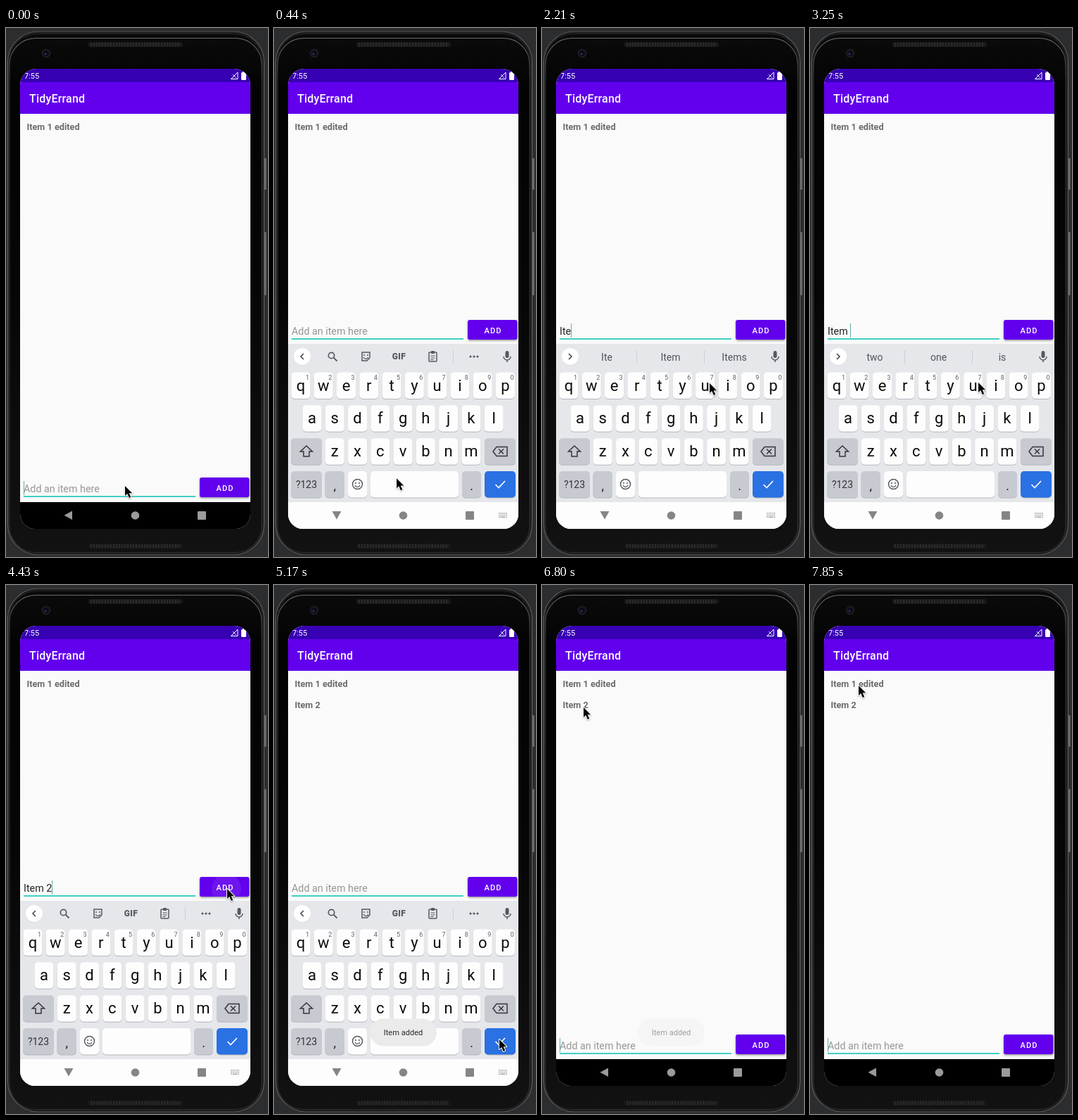
An HTML page with a canvas for the animation above (8 s loop, 372 by 752 pixels).

```html
<!DOCTYPE html>
<html lang="en">
<head>
<meta charset="utf-8">
<title>To-do list demo</title>
<style>
html, body { margin: 0; width: 100%; height: 100%; overflow: hidden; background: #2c2d2f; }
canvas { display: block; width: 372px; height: 752px; }
</style>
</head>
<body>
<canvas id="stage" width="372" height="752"></canvas>
<script>
const ctx = document.getElementById('stage').getContext('2d');
const LOOP = 8000, STEP = 148, STEP_LEAD = 14;
const PURPLE = '#6200ee', PAPER = '#fafafa', ICON = '#565a60';
const KEYBOARD_HEIGHT = 224, PITCH = 32.27;

// Pointer tip: step, x, y
const POINTER = [
  [0, 169, 651], [2, 169, 651], [8, 238, 505], [21, 238, 505], [22, 239, 504],
  [23, 243, 500], [26, 349, 407], [28, 314, 432], [33, 314, 432], [36, 322, 721],
  [38, 327, 651], [42, 327, 651], [45, 89, 200], [46, 59, 174], [49, 63, 160],
  [52, 70, 139], [53, 69, 143]
];
const TYPED = [[12, 'I'], [14, 'It'], [15, 'Ite'], [17, 'Item'], [18, 'Item '], [23, 'Item 2'], [32, '']];
const SUGGESTIONS = [
  [14, ['It', 'It\u2019s', 'Its']], [15, ['Ite', 'Item', 'Items']],
  [17, ['Item', 'items', 'Items']], [19, ['two', 'one', 'is']], [23, null]
];

function box(x, y, w, h, r, fill) {
  ctx.beginPath();
  ctx.roundRect(x, y, w, h, r);
  ctx.fillStyle = fill;
  ctx.fill();
}

function disc(x, y, r, fill) {
  ctx.beginPath();
  ctx.arc(x, y, r, 0, Math.PI * 2);
  ctx.fillStyle = fill;
  ctx.fill();
}

function line(points, color, width = 1.5, close = false) {
  ctx.beginPath();
  points.forEach(([x, y]) => ctx.lineTo(x, y));
  if (close) ctx.closePath();
  ctx.strokeStyle = color;
  ctx.lineWidth = width;
  ctx.stroke();
}

function shape(points, fill) {
  ctx.beginPath();
  points.forEach(([x, y]) => ctx.lineTo(x, y));
  ctx.closePath();
  ctx.fillStyle = fill;
  ctx.fill();
}

function ring(x, y, r, color, width = 1.5, from = 0, to = Math.PI * 2) {
  ctx.beginPath();
  ctx.arc(x, y, r, from, to);
  ctx.strokeStyle = color;
  ctx.lineWidth = width;
  ctx.stroke();
}

function frameBox(x, y, w, h, r, color, width = 1.5) {
  ctx.beginPath();
  ctx.roundRect(x, y, w, h, r);
  ctx.strokeStyle = color;
  ctx.lineWidth = width;
  ctx.stroke();
}

function fade(...stops) {
  const gradient = ctx.createLinearGradient(0, 0, 0, 752);
  stops.forEach(([at, color]) => gradient.addColorStop(at, color));
  return gradient;
}

function text(str, x, y, size, color, { weight = 400, align = 'left', spacing = 0 } = {}) {
  ctx.font = `${weight} ${size}px Roboto, sans-serif`;
  ctx.letterSpacing = spacing + 'px';
  ctx.textAlign = align;
  ctx.fillStyle = color;
  ctx.fillText(str, x, y);
  const width = ctx.measureText(str).width;
  ctx.letterSpacing = '0px';
  return width;
}

const latest = (track, step, initial) =>
  track.reduce((value, [start, next]) => (step >= start ? next : value), initial);

function pointerAt(step) {
  const next = POINTER.findIndex(p => p[0] > step);
  if (next < 0) return POINTER.at(-1).slice(1);
  const [s0, x0, y0] = POINTER[next - 1], [s1, x1, y1] = POINTER[next];
  const u = (step - s0) / (s1 - s0), e = u * u * (3 - 2 * u);
  return [x0 + (x1 - x0) * e, y0 + (y1 - y0) * e];
}

function caretVisible(step) {
  if (step < 2 || (step > 10 && step < 26) || (step > 27 && step < 32)) return true;
  return (step - 44.1 + 68) % 6.8 < 3.4;
}

function drawGrille(y) {
  box(117, y, 134, 7, 3, '#191919');
  for (let x = 120; x < 248; x += 4) {
    line([[x, y + 1], [x + 2, y + 3.5], [x, y + 6]], '#414141', 1);
  }
}

function drawPhone() {
  ctx.fillStyle = '#2c2d2f';
  ctx.fillRect(0, 0, 372, 752);
  box(367, 185, 2.5, 45, 1, '#707173');
  box(367, 290, 2.5, 90, 1, '#707173');
  box(2, 4, 365, 746, 43, '#1d1d1e');
  frameBox(2.5, 5, 364, 744, 43, '#5c5d5e', 1.2);
  box(5, 9, 358, 737, 39, fade([0, '#0c0c0c'], [0.12, '#030303'], [0.5, '#060606'], [1, '#121212']));
  frameBox(5, 14.5, 358, 731, 37, fade([0, '#777'], [0.05, '#555'], [0.1, '#2c2c2c'], [1, '#2c2c2c']), 1.2);
  drawGrille(20);
  drawGrille(733);
  disc(57, 36, 6.5, '#1b1b21');
  disc(57, 36, 4, '#0b0c18');
  disc(56, 37, 1.5, '#2b355a');
}

function drawHeader() {
  ctx.fillStyle = '#3700b3';
  ctx.fillRect(20, 58, 327, 19);
  ctx.fillStyle = PURPLE;
  ctx.fillRect(20, 77, 327, 45);
  text('7:55', 26, 72, 11, '#fff');
  line([[319.5, 72.5], [329, 63], [329, 72.5]], '#fff', 1, true);
  line([[322, 66], [327, 71]], '#fff', 0.8);
  box(334, 63, 7, 11, 1.5, '#fff');
  box(336, 61.7, 3, 2, 0, '#fff');
  text('TidyErrand', 33, 105.5, 16, '#fff', { weight: 500, spacing: 0.2 });
}

function drawForm(step, top) {
  const typed = latest(TYPED, step, '');
  const width = text(typed || 'Add an item here', 25, top + 20.5, 14.3, typed ? '#222' : '#969696');
  if (caretVisible(step)) {
    ctx.fillStyle = '#62aea8';
    ctx.fillRect(Math.round(25 + (typed ? width : 0)), top + 5, 1, 20);
  }
  ctx.fillStyle = '#40d0c4';
  ctx.fillRect(25, top + 26, 244, 2);

  ctx.save();
  ctx.shadowColor = 'rgba(0,0,0,.4)';
  ctx.shadowBlur = 3;
  ctx.shadowOffsetY = 1.5;
  box(275, top, 70.5, 28, 3, PURPLE);
  ctx.restore();
  if (step >= 30 && step < 33) {
    ctx.save();
    ctx.beginPath();
    ctx.roundRect(275, top, 70.5, 28, 3);
    ctx.clip();
    disc(313, top + 17, 21 + (step - 30) * 14, 'rgba(255,255,255,.08)');
    ctx.restore();
  }
  text('ADD', 311, top + 18.6, 11.1, '#fff', { weight: 500, align: 'center', spacing: 1 });
}

function drawKey(x, y, w, fill) {
  box(x, y + 1, w, 37.5, 5, '#b4b7bc');
  box(x, y, w, 37.5, 5, fill);
}

function drawMic(x, y) {
  box(x - 2.5, y - 8, 5, 10, 2.5, ICON);
  ring(x, y, 5, ICON, 1.5, 0, Math.PI);
  line([[x, y + 5], [x, y + 8]], ICON);
}

function drawSmile(x, y) {
  disc(x - 2.5, y - 1.5, 1, ICON);
  disc(x + 2.5, y - 1.5, 1, ICON);
  ring(x, y + 0.5, 3.4, ICON, 1.3, 0.3, Math.PI - 0.3);
}

function drawToolbar(words) {
  const y = 467;
  disc(40, y + 0.6, 12, '#cfd1d5');
  disc(40, y, 12, '#fff');
  const d = words ? -1 : 1;
  line([[40 + 2 * d, y - 4], [40 - 2 * d, y], [40 + 2 * d, y + 4]], '#3f4247');
  drawMic(331, y);
  ctx.fillStyle = '#cdd0d5';
  if (words) {
    ctx.fillRect(134, 458, 1, 19);
    ctx.fillRect(230, 458, 1, 19);
    words.forEach((word, i) => text(word, 92 + i * 90.5, 472.5, 14, '#50545a', { align: 'center' }));
    return;
  }
  ctx.fillRect(254, 458, 1, 19);
  ring(81.5, y - 1.5, 4.2, ICON, 1.7);
  line([[84.7, y + 1.7], [89.5, y + 6.5]], ICON, 1.9);
  line([[136, y + 2], [136, y - 6], [125, y - 6], [125, y + 6], [132, y + 6], [136, y + 2]], ICON);
  drawSmile(130.5, y - 0.5);
  text('GIF', 177.5, y + 4.2, 12, ICON, { weight: 900, align: 'center', spacing: 0.3 });
  frameBox(220, y - 6, 11, 13, 1, ICON);
  box(223, y - 8, 5, 4, 1, ICON);
  [-1, 2, 4.5].forEach((dy, i) => line([[222.5, y + dy], [i === 2 ? 226.5 : 228.5, y + dy]], ICON, 1.1));
  [-5, 0, 5].forEach(dx => disc(284 + dx, y, 1.6, ICON));
}

function drawLetters(letters, x, y) {
  [...letters].forEach((letter, i) => {
    const cx = x + i * PITCH;
    drawKey(cx - 13.5, y, 27, '#fdfdfd');
    text(letter, cx, y + 26, 22, '#0c0c0c', { align: 'center' });
  });
}

function drawKeyboard(step) {
  const special = '#c7cad0';
  ctx.fillStyle = '#e5e7eb';
  ctx.fillRect(20, 449, 327, 226);
  drawToolbar(latest(SUGGESTIONS, step, null));

  drawLetters('qwertyuiop', 38, 489.5);
  for (let i = 0; i < 10; i++) {
    text((i + 1) % 10, 47.5 + i * PITCH, 499.5, 9, '#5c5f64', { align: 'center' });
  }
  drawLetters('asdfghjkl', 54, 536.3);
  drawLetters('zxcvbnm', 86.3, 583.2);

  drawKey(24, 583.2, 44, special);
  line([[46, 594], [37.5, 602], [42, 602], [42, 609], [50, 609], [50, 602], [54.5, 602]], '#33363b', 1.5, true);
  drawKey(299, 583.2, 44, special);
  line([[311, 602], [316, 595.5], [331, 595.5], [331, 608.5], [316, 608.5]], '#33363b', 1.5, true);
  line([[319, 598.5], [326, 605.5]], '#33363b');
  line([[326, 598.5], [319, 605.5]], '#33363b');

  drawKey(24, 630, 44, special);
  text('?123', 46, 654, 14, '#303338', { align: 'center' });
  drawKey(72.5, 630, 27.5, special);
  text(',', 86.3, 657, 18, '#202226', { align: 'center' });
  drawKey(105, 630, 27, '#fdfdfd');
  ring(118.5, 648.5, 7, ICON);
  drawSmile(118.5, 648.5);
  drawKey(137, 630, 125, '#fdfdfd');
  drawKey(267, 630, 27, special);
  text('.', 280.5, 657, 18, '#202226', { align: 'center' });
  drawKey(299, 630, 44, step >= 40 && step < 43 ? '#2057b8' : '#2a71e3');
  line([[314.5, 649], [319, 653.5], [328, 644]], '#fff', 1.7);
}

function drawNavigation(light) {
  const color = light ? '#858585' : '#9a9a9a';
  ctx.fillStyle = light ? '#fdfdfd' : '#000';
  ctx.fillRect(20, 674, 327, 38);
  shape(light ? [[82.5, 687], [95.5, 687], [89, 698.5]] : [[94, 686.5], [94, 699], [82.5, 692.7]], color);
  disc(183.5, 693, 5.8, color);
  box(272, 687, 12, 12, 1, color);
  if (!light) return;
  for (let row = 0; row < 3; row++) {
    for (let col = 0; col < 5; col++) {
      if (row < 2 || col === 0 || col === 4) box(319 + col * 2.6, 689 + row * 2.7, 1.6, 1.6, 0, '#a2a2a2');
    }
  }
  box(321.6, 694.4, 6.8, 1.6, 0, '#a2a2a2');
}

function drawToast(step) {
  ctx.globalAlpha = step === 33 || step === 46 ? 0.42 : 1;
  box(136, 616.5, 95, 39, 19.5, '#ebebeb');
  text('Item added', 183.5, 640, 11.1, '#2b2b2b', { align: 'center' });
  ctx.globalAlpha = 1;
}

function drawPointer([x, y]) {
  ctx.save();
  ctx.translate(x, y);
  const arrow = [[0, 0], [0, 14], [3.2, 11], [5.8, 17], [8.3, 16], [5.7, 10.2], [10.2, 10.2]];
  ctx.shadowColor = 'rgba(0,0,0,.3)';
  ctx.shadowBlur = 2;
  ctx.shadowOffsetY = 1;
  ctx.lineJoin = 'round';
  line(arrow, '#fff', 2, true);
  ctx.shadowColor = 'transparent';
  shape(arrow, '#000');
  ctx.restore();
}

function draw(time) {
  const step = Math.floor((time + STEP_LEAD) / STEP);
  const rise = step === 2 || step === 42 ? 0.5 : step > 2 && step < 42 ? 1 : 0;
  const raised = step >= 3 && step < 42;

  drawPhone();
  ctx.save();
  ctx.beginPath();
  ctx.roundRect(20, 58, 327, 654, [23, 23, 21, 21]);
  ctx.clip();
  ctx.fillStyle = PAPER;
  ctx.fillRect(20, 58, 327, 654);
  drawHeader();
  text('Item 1 edited', 29.5, 145, 12.7, '#6c6c6c', { weight: 700 });
  if (step >= 32) text('Item 2', 29.5, 175, 12.7, '#6c6c6c', { weight: 700 });
  drawForm(step, 639 - (raised ? KEYBOARD_HEIGHT : 0));
  if (rise) {
    ctx.save();
    ctx.translate(0, (1 - rise) * KEYBOARD_HEIGHT);
    drawKeyboard(step);
    ctx.restore();
  }
  drawNavigation(step >= 2 && step < 42);
  if (step >= 33 && step <= 46) drawToast(step);
  ctx.restore();
  drawPointer(pointerAt(step));
}

function tick() {
  draw(performance.now() % LOOP);
  requestAnimationFrame(tick);
}
tick();
</script>
</body>
</html>
```
